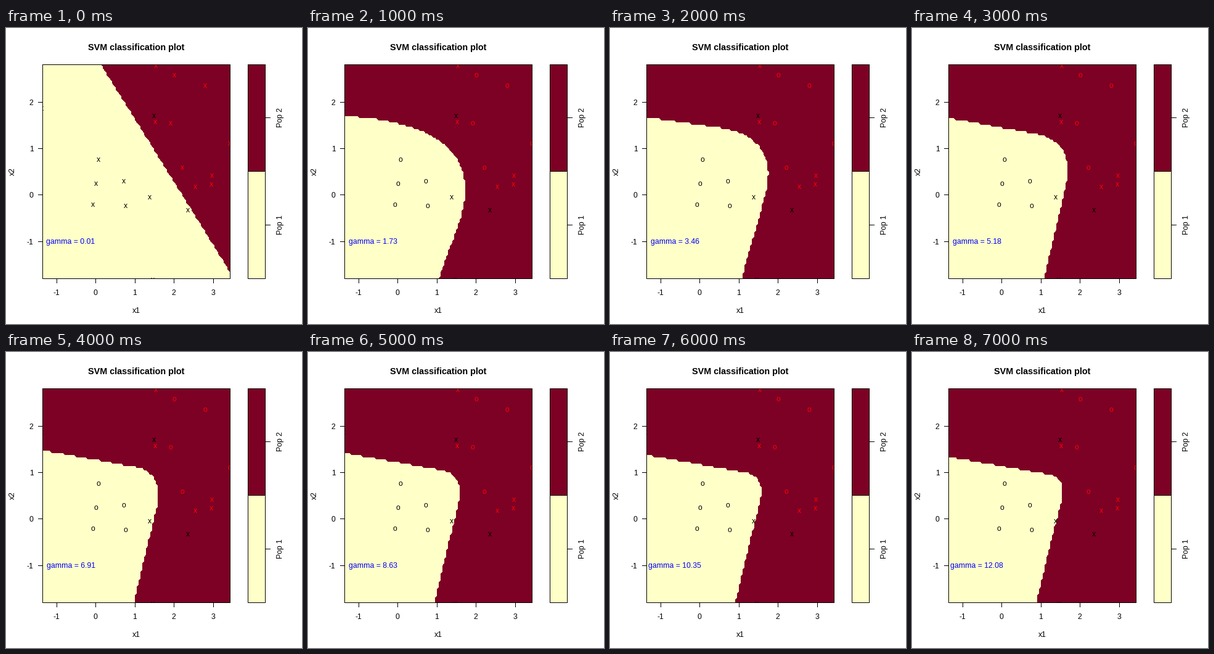
A matplotlib script that plays this animation: 480x480 px, repeating every 8000 ms.

```python
import numpy as np
import matplotlib.pyplot as plt
from matplotlib.animation import FuncAnimation
from matplotlib.path import Path
from matplotlib.patches import Rectangle

SIZE, DPI = 480, 96
PX = 72 / DPI
LEFT, TOP, RIGHT, BOTTOM = 59, 59, 363, 406
CELLS = 99
YELLOW, MAROON = "#FFFFC8", "#7D0025"
RGB = np.array([[255, 255, 200], [125, 0, 37]], dtype=np.uint8)
GAMMAS = np.linspace(0.01, 50, 30)[:8]

# Key values of the boundary, interpolated over log(gamma)
KEY_GAMMA = np.log([1.73, 5.18, 6.91, 12.08])
LEFT_Y = (144.5, 148, 161.5, 172)
CORNER_X = (298, 264.6, 256.5, 249.8)
CORNER_Y = (165, 185.3, 197.1, 205.7)
BOTTOM_X = (211.5, 213.5, 206.5, 200.5)

# Support vectors keep the cross, the others turn into circles
BLACK_SV = [(58, 130), (240, 142), (233, 274), (295, 295), (237.5, 408)]
BLACK_FREE = [(149.5, 213), (145.5, 252), (190.5, 248), (140.5, 286), (193.5, 288)]
RED_SV = [(242.5, 61), (242, 152), (334, 239), (333, 253), (307, 257)]
RED_FREE = [(272.5, 76), (323, 93), (267, 154.5), (363, 187), (286, 226)]


def boundary(gamma):
    """Outline of class 1: two straight edges whose corner sharpens with gamma."""
    if gamma < 0.1:  # almost linear kernel
        return np.array([(50, 50), (146.9, 50), (374, 415), (374, 420), (50, 420)])
    left_y, cx, cy, bottom_x = (
        np.interp(np.log(gamma), KEY_GAMMA, key)
        for key in (LEFT_Y, CORNER_X, CORNER_Y, BOTTOM_X))
    corner = np.array([cx, cy])
    cut = 1.6 / gamma
    start = corner + cut * (np.array([LEFT, left_y]) - corner)
    end = corner + 0.67 * cut ** 0.6 * (np.array([bottom_x, BOTTOM]) - corner)
    t = np.linspace(0, 1, 40)[:, None]
    bend = (1 - t) ** 2 * start + 2 * t * (1 - t) * corner + t ** 2 * end
    return np.vstack([(50, left_y), (LEFT, left_y), bend, (bottom_x, BOTTOM),
                      (bottom_x, 420), (50, 420)])


def region(gamma):
    """Pixel image of the two classes, built from a grid of predictions."""
    x = np.linspace(LEFT, RIGHT, CELLS + 1)
    y = np.linspace(TOP, BOTTOM, CELLS + 1)
    nodes = np.stack(np.meshgrid(x, y), axis=-1).reshape(-1, 2)
    inside = Path(boundary(gamma)).contains_points(nodes)
    cls = ~inside.reshape(CELLS + 1, CELLS + 1)

    # Polygon corners are cut down to whole pixels, hence the offset of one
    u = (np.arange(RIGHT - LEFT + 1) + 1) * CELLS / (RIGHT - LEFT)
    v = (np.arange(BOTTOM - TOP + 1) + 1) * CELLS / (BOTTOM - TOP)
    u, v = np.meshgrid(u, v)
    i = np.minimum(u.astype(int), CELLS - 1)
    j = np.minimum(v.astype(int), CELLS - 1)
    u, v = u - i, v - j
    a, b, c, d = cls[j, i], cls[j, i + 1], cls[j + 1, i], cls[j + 1, i + 1]
    # A cell with three corners in class 2 is filled as a triangle
    full = a.astype(int) + b + c + d >= 3
    full &= (a | (u + v >= 1)) & (d | (u + v <= 1))
    full &= (b | (u <= v)) & (c | (u >= v))
    return RGB[full.astype(int)]


fig = plt.figure(figsize=(SIZE / DPI, SIZE / DPI), dpi=DPI, facecolor="white")
ax = fig.add_axes([0, 0, 1, 1])
ax.axis("off")

images = [region(g) for g in GAMMAS]
image = ax.imshow(images[0], extent=(LEFT, RIGHT + 1, BOTTOM + 1, TOP),
                  interpolation="nearest", aspect="auto", zorder=1)
ax.set_xlim(0, SIZE)
ax.set_ylim(SIZE, 0)


def label(x, y, s, size=12.3, **kw):
    kw = {"ha": "center", "va": "baseline", "rotation_mode": "anchor",
          "family": "Liberation Sans", **kw}
    return ax.text(x, y, s, fontsize=size * PX, **kw)


def fill(x0, y0, x1, y1, color="black", zorder=5):
    """Fill whole pixels from one corner to the other, both included."""
    ax.add_patch(Rectangle((x0, y0), x1 - x0 + 1, y1 - y0 + 1,
                           fc=color, lw=0, zorder=zorder))


def box(x0, y0, x1, y1):
    for y in (y0, y1):
        fill(x0, y, x1, y)
    for x in (x0, x1):
        fill(x, y0, x, y1)


window = Rectangle((LEFT, TOP), RIGHT - LEFT + 1, BOTTOM - TOP + 1,
                   transform=ax.transData)


def points(places, color):
    marks = [label(x, y + 4, "x", color=color, zorder=3) for x, y in places]
    for m in marks:
        m.set_clip_on(True)
        m.set_clip_path(window)
    return marks


points(BLACK_SV, "black")
points(RED_SV, "red")
free = points(BLACK_FREE, "black") + points(RED_FREE, "red")

# Frame, axes and titles
box(LEFT, TOP, RIGHT, BOTTOM)
for k in range(-1, 4):
    x = round(145.4 + 63.4 * k)
    fill(x, BOTTOM, x, BOTTOM + 7)
    label(x - 0.5, 433, str(k))
for k in range(-1, 3):
    y = round(270.4 - 75.4 * k)
    fill(LEFT - 7, y, LEFT, y)
    label(44.5, y + 5, str(k), ha="right")
label(211, 36, "SVM classification plot", 14.4, weight="bold")
label(211, 462, "x1")
label(14, 233, "x2", rotation=90)

# Colour key
fill(392, TOP, 420, 231, MAROON, zorder=1)
fill(392, 232, 420, BOTTOM, YELLOW, zorder=1)
box(392, TOP, 420, BOTTOM)
fill(392, 232, 420, 232)
for y, name in ((145, "Pop 2"), (319, "Pop 1")):
    fill(420, y, 428, y)
    label(448, y, name, rotation=90)

gamma_text = label(105, 350, "", color="blue", zorder=4)


def draw(n):
    image.set_data(images[n])
    for m in free:
        m.set_text("o" if n else "x")
    gamma_text.set_text(f"gamma = {GAMMAS[n]:.2f}")
    return [image, gamma_text, *free]


anim = FuncAnimation(fig, draw, frames=len(GAMMAS), interval=1000, repeat=True)
plt.show()
```
